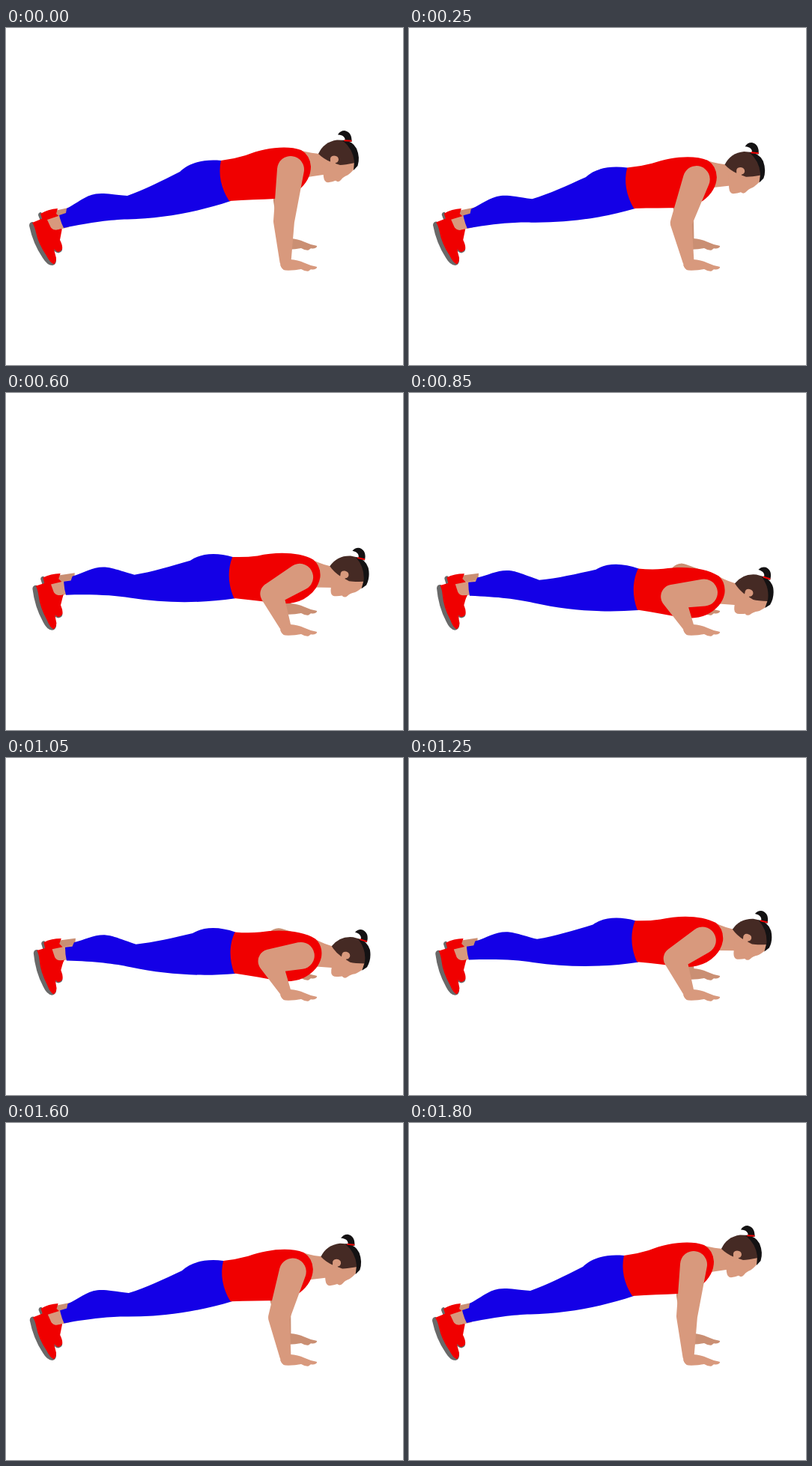
An HTML page that plays this animation: 530x450 px, repeating every 1.85 s.

```html
<!DOCTYPE html>
<html lang="en">
<head>
<meta charset="utf-8">
<title>Push-up</title>
<style>
  html, body { margin: 0; width: 100%; height: 100%; overflow: hidden; background: #fff; }
  svg { display: block; width: 530px; height: 450px; }
  .red { fill: #f00000; }
  .blue { fill: #1400e6; }
  .skin { fill: #d8997d; }
  .shade { fill: #ca8f73; }
  .sole { fill: #696969; }
  .brown { fill: #452a24; }
  .black { fill: #141213; }
</style>
</head>
<body>
<svg viewBox="0 0 530 450">
  <defs>
    <path id="hand" d="M366 316Q368 323 373 323.6Q385 324 394 322Q400 325.5 404 324.6L407 322.2Q411 323 413.5 321.5Q416 320 414.5 318.8Q405 317 398 313.6Q390 309.5 379 309Z"/>
  </defs>

  <g class="shade">
    <path id="farArm"/>
    <use href="#hand" y="-28"/>
  </g>

  <g id="farShoe">
    <path class="sole" d="M43 250Q43 246 47 246L66 296Q73 297 75 294Q76 299 70 300.5Q65 300 60 293Z"/>
    <path class="shade" d="M65 244L88 239L88 248L69 253Z"/>
    <path class="red" d="M46 248Q56 242 69 241L67 248L76 256Q75 270 72 283Q76 291 75 295Q73 299 69 299Q63 296 58 284Z"/>
  </g>

  <g id="nearShoe">
    <path class="sole" d="M31 264Q31 259 36 259L62 308Q67 307 67 310Q67 316 62 317Q55 317 49 307Q36 288 31 264Z"/>
    <path class="skin" d="M55 256L82 247L84 266L62 271Z"/>
    <path class="red" d="M35 260Q45 256 54 252Q54 264 63 269Q69 271 73 268Q70 278 64 284Q63 296 67 307Q67 313 64 315.5Q59 314 54 304Q43 288 40 273Q38 264 35 260Z"/>
  </g>

  <g id="body">
    <path class="blue" d="M81 241L80 247L71 250Q73 259 77 267C115 259 140 256 162 255.5C210 254 255 246 300 231L305 205L287 177C265 175 245 179 232 192C208 204 185 216 162 224C140 222 130 220 120 221.5C105 224 95 234 81 241Z"/>
    <g id="chest">
      <path class="skin" d="M392 163Q408 168 424 168L430 195L403 199Z"/>
      <g id="head">
        <path class="skin" d="M421 172L424 199Q425 206.5 430 206.3Q436 205.5 440 203.8Q444 207 447.5 202.5Q450 199 456 196.5Q460 194 465 188L467 176L440 166Z"/>
        <path class="brown" d="M417 168Q424 152 442 149.4L456 150L467 168L466 180Q452 183 446 183L434 179Q424 175 417 168Z"/>
        <path class="skin" d="M433 177Q432 171 438 170.6Q444 171 444 176Q443 180 440 180Q440 185 433 185Z"/>
        <path class="black" d="M449 150Q462 150 468 161Q473 173 469.5 184L464 190L465 178Q463 161 449 150Z"/>
        <path class="black" d="M443 142.5Q446 137 452 137Q462 139 461.5 152H452.5Q454 143 443 142.5Z"/>
        <path class="red" d="M451.5 149.3L461.5 149.8L461.3 151.8L451.3 151.2Z"/>
      </g>
      <path class="red" d="M287 177C283 195 287 214 298 231C320 229.5 340 229 360 228Q378 226 390 217Q407 203 407 185Q406 170 394 163C375 156 345 160 320 170Q304 175 287 177Z"/>
    </g>
  </g>

  <g class="skin">
    <path id="nearArm"/>
    <use href="#hand"/>
  </g>
</svg>

<script>
const LOOP = 1850, STEP = 50, LOW = 925, TOP = 1800;
const LEAN = 14.3, BEND = -1.4;
const TOE = [64, 285], WAIST = [293, 205], NECK = [415, 183];
const SHOULDER = [380, 189], WRIST = [373, 312], FAR = -28;
const el = id => document.getElementById(id);
const ease = x => (1 - Math.cos(Math.PI * x)) / 2;

// 0 with straight arms, 1 at the floor.
function depth(t) {
  return t < LOW ? ease(t / LOW) : ease(Math.max(0, TOP - t) / (TOP - LOW));
}

function rotate([x, y], deg, [cx, cy]) {
  const a = deg * Math.PI / 180, dx = x - cx, dy = y - cy;
  return [cx + dx * Math.cos(a) - dy * Math.sin(a), cy + dx * Math.sin(a) + dy * Math.cos(a)];
}

function turn(id, deg, pivot) {
  el(id).setAttribute('transform', `rotate(${deg} ${pivot})`);
}

// Outline around two circles, the wider one first.
function limb(a, ra, b, rb) {
  const dx = b[0] - a[0], dy = b[1] - a[1];
  const dir = Math.atan2(dy, dx), side = Math.acos((ra - rb) / Math.hypot(dx, dy));
  const at = (c, r, ang) => [c[0] + r * Math.cos(ang), c[1] + r * Math.sin(ang)];
  return `M${at(a, ra, dir + side)}A${ra} ${ra} 0 1 1 ${at(a, ra, dir - side)}` +
    `L${at(b, rb, dir - side)}A${rb} ${rb} 0 0 1 ${at(b, rb, dir + side)}Z`;
}

function arm(id, shoulder, elbow, wrist, p) {
  const r = 14 + 2 * p;
  el(id).setAttribute('d', limb(shoulder, 18, elbow, r) + limb(elbow, r, wrist, 7.5));
}

function draw(p) {
  turn('body', LEAN * p, TOE);
  turn('chest', BEND * p, WAIST);
  turn('head', -BEND * p, NECK);
  turn('nearShoe', 7 * p, [64, 312]);
  turn('farShoe', 5 * p, [70, 299]);

  const [sx, sy] = rotate(rotate(SHOULDER, BEND * p, WAIST), LEAN * p, TOE);
  const ex = 371 - 19 * Math.sqrt(p), ey = 258 + 14 * p;
  arm('nearArm', [sx, sy], [ex, ey], WRIST, p);
  arm('farArm', [sx, sy - 10 * p], [ex + 12 * p, ey + FAR], [WRIST[0], WRIST[1] + FAR], p);
}

function tick() {
  const t = performance.now() % LOOP;
  draw(depth(Math.floor(t / STEP) * STEP));
  requestAnimationFrame(tick);
}
tick();
</script>
</body>
</html>
```
